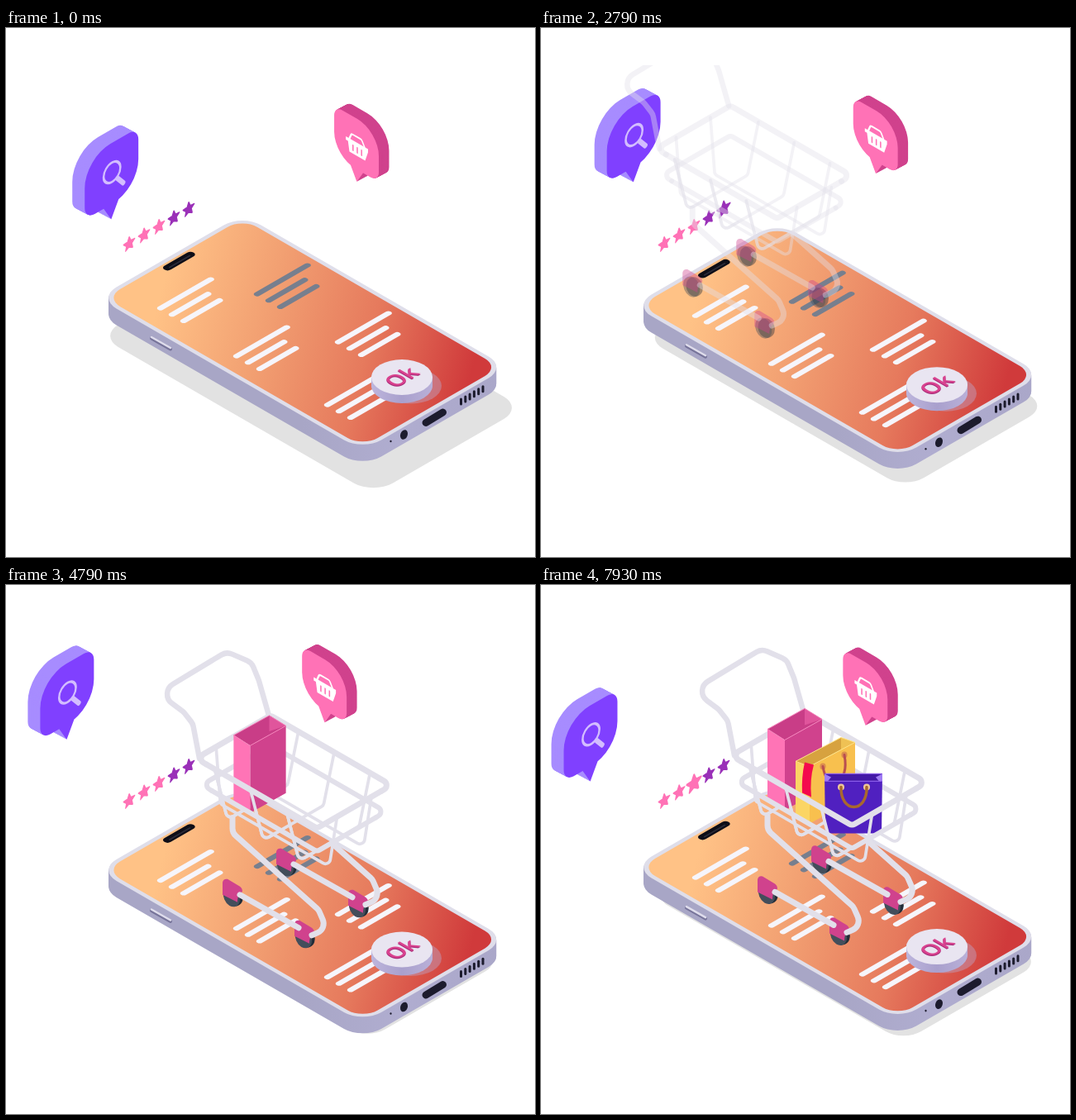
These frames come from a looping animation (640 px wide and 640 px high, 8 s). An HTML page with a canvas:

```html
<!DOCTYPE html>
<html lang="en">
<head>
<meta charset="utf-8">
<title>Mobile shopping</title>
<style>
html, body { margin: 0; width: 100%; height: 100%; overflow: hidden; background: #fff; }
canvas { display: block; }
</style>
</head>
<body>
<canvas id="stage" width="640" height="640"></canvas>
<script>
const ctx = document.getElementById('stage').getContext('2d');
const LOOP = 8000, COS = .866, SIN = .5;
const PINK = '#ff72b6', DEEP_PINK = '#d0428d', TUBE = '#e2e0ea', INK = '#1c1b2d';

// ---------- helpers ----------
// Planes of the isometric view: floor, wall rising to the right, wall falling to the right
const FLOOR = [COS, SIN, -COS, SIN], RISE = [COS, -SIN, 0, 1], FALL = [COS, SIN, 0, 1];

function at(x, y, draw, plane = [1, 0, 0, 1], scale = 1) {
  ctx.save();
  ctx.translate(x, y);
  ctx.transform(...plane, 0, 0);
  ctx.scale(scale, scale);
  draw();
  ctx.restore();
}

function fill(path, color) {
  ctx.fillStyle = color;
  ctx.fill(path);
}

function stroke(path, color, width) {
  ctx.strokeStyle = color;
  ctx.lineWidth = width;
  ctx.lineCap = ctx.lineJoin = 'round';
  ctx.stroke(path);
}

function shape(pts) {
  const p = new Path2D();
  pts.forEach(pt => p.lineTo(...pt));
  p.closePath();
  return p;
}

const poly = (color, ...pts) => fill(shape(pts), color);

function ellipse(x, y, rx, ry, color, rot = 0) {
  const p = new Path2D();
  p.ellipse(x, y, rx, ry, rot, 0, 7);
  fill(p, color);
}

// Open polyline with rounded corners
function tube(pts, width, r = 6, color = TUBE) {
  const p = new Path2D();
  p.moveTo(...pts[0]);
  for (let i = 1; i < pts.length - 1; i++) p.arcTo(...pts[i], ...pts[i + 1], r);
  p.lineTo(...pts[pts.length - 1]);
  stroke(p, color, width);
}

// Bar on the floor that runs up and to the right
function floorBar(x, y, length, width, color) {
  at(x, y, () => tube([[0, 0], [0, -length]], width, 0, color), FLOOR);
}

// Union of a path dragged along a vector
function sweep(path, dx, dy, color) {
  for (let k = 1; k >= 0; k -= .05) at(dx * k, dy * k, () => fill(path, color));
}

function gradient(x1, y1, x2, y2, ...colors) {
  const g = ctx.createLinearGradient(x1, y1, x2, y2);
  colors.forEach((c, i) => g.addColorStop(i / (colors.length - 1), c));
  return g;
}

function backOut(p) {
  const q = Math.min(p, 1) - 1;
  return 1 + 2.70158 * q ** 3 + 1.70158 * q ** 2;
}

// ---------- phone ----------
function slab(inset) {
  const flat = new Path2D(), out = new Path2D();
  flat.roundRect(inset, inset, 370 - 2 * inset, 202 - 2 * inset, 26 - inset);
  out.addPath(flat, new DOMMatrix([...FLOOR, 286, 225.4]));
  return out;
}

const body = slab(0), screen = slab(5);
const bodyTint = gradient(124, 0, 593, 0, '#a8a6c6', '#a8a6c6', '#a8a6c6', '#b0add0', '#aaa7c9');
const screenTint = gradient(190, 310, 565, 410, '#ffc286', '#f2a072', '#e67a5d', '#d03a3b');
const buttonTint = gradient(442, 0, 516, 0, '#bdb5dc', '#a9a0cd', '#b9b0d8');

function shadow(dy) {
  const scale = 1.036 - .0054 * dy;
  at(369, 416, () => at(-358.7, -368.4, () => fill(body, '#e2e2e2')), undefined, scale);
}

function textBlock(x, y, color = '#f6f5fb') {
  for (let i = 0; i < 3; i++) {
    floorBar(x + 14 * i, y + 7.7 * i, i ? 50 : 70, 7, color);
  }
}

function okButton() {
  ellipse(490, 433, 37, 21.5, 'rgba(185,170,205,.42)');
  for (let d = 10; d >= 0; d--) ellipse(479, 422.5 + d, 37, 21.5, d ? buttonTint : '#e9e5f1');
  ctx.font = '600 26px "Open Sans", sans-serif';
  ctx.textAlign = 'center';
  ['#a92b78', '#d9428f'].forEach((color, i) => at(486.5, 428 - 1.3 * i, () => {
    ctx.fillStyle = color;
    ctx.fillText('Ok', 0, 0);
  }, [COS, -SIN, COS, SIN]));
}

function phone() {
  sweep(body, 0, 20, bodyTint);
  fill(body, '#dfdeea');
  fill(screen, screenTint);

  floorBar(195.5, 290, 32, 9, '#0e0e17');
  floorBar(198, 289.5, 28, 2, '#2b2b38');

  textBlock(187, 339);
  textBlock(304, 322, '#777f8e');
  textBlock(279, 397);
  textBlock(402, 380);
  textBlock(389, 456);

  tube([[176, 375.5], [199, 388.5]], 4, 0, '#77749a');
  tube([[176, 374], [199, 387]], 2.5, 0, '#dfddec');

  ellipse(465.5, 500, 1.1, 1.3, INK);
  ellipse(481.5, 492, 4.3, 6, INK, .35);
  tube([[508, 477.5], [528.5, 465]], 9, 0, INK);
  for (let i = 0; i < 6; i++) {
    const x = 550.5 + 5.3 * i, y = 452 - 3.05 * i;
    tube([[x, y - 3], [x, y + 3]], 3, 0, INK);
  }
  okButton();
}

// ---------- speech bubbles ----------
// dir -1 gives the mirrored bubble
function bubble(x, y, dir, scale, front, side) {
  const flat = shape([[23, 68], [50, 68], [37, 92]]), path = new Path2D();
  flat.roundRect(0, 0, 75, 74, [36, 14, 36, 14]);
  path.addPath(flat, new DOMMatrix([COS * dir * scale, -SIN * scale, 0, scale, x, y]));
  sweep(path, -15 * dir * scale, -8 * scale, side);
  fill(path, front);
}

function searchBubble() {
  bubble(95, 157.5, 1, 1, '#8040ff', '#a78cff');
  at(128, 174, () => {
    const ring = new Path2D();
    ring.arc(0, 0, 11.7, 0, 7);
    stroke(ring, '#d3bdff', 3);
    tube([[8, 11.5], [16, 21]], 5.5, 0, '#d3bdff');
  }, RISE);
}

function basketBubble() {
  bubble(451, 125, -1, .83, PINK, DEEP_PINK);
  at(425, 144, () => {
    poly('#fff', [-16, -5], [15, -5], [15, -1], [11, 11], [-11, 11], [-13, -1], [-16, -1]);
    tube([[-11, -5], [-8, -12], [6, -12], [10, -5]], 2.2, 3, '#fff');
    for (let x = -6; x <= 6; x += 6) tube([[x, 1], [x, 7]], 1.8, 0, PINK);
  }, FALL);
}

// ---------- rating stars ----------
function star(i, t) {
  const period = 6380, half = period / 2;
  const d = ((t - 600 - 480 * i + half + period) % period - half) / 550;
  const scale = Math.abs(d) < 1 ? 1 + .3 * Math.cos(d * Math.PI / 2) ** 2 : 1;
  const color = i < 3 ? PINK : '#9a30b8';
  const pts = Array.from({ length: 10 }, (_, k) => {
    const r = k % 2 ? 3.7 : 8, a = k * Math.PI / 5;
    return [r * Math.sin(a), -r * Math.cos(a)];
  });
  at(149 + 18 * i, 261 - 10.5 * i, () => {
    fill(shape(pts), color);
    stroke(shape(pts), color, 1.8);
  }, RISE, scale);
}

// ---------- cart ----------
// u runs along the basket, v across it, z upwards from the top rim
const iso = (u, v, z = 0) => [320 + COS * (u - v), 154 + SIN * (u + v) - z];
const LENGTH = 169, WIDTH = 104, DEPTH = -66;

function rim(inset, z, width, front) {
  const u0 = inset, u1 = LENGTH - inset, v0 = inset, v1 = WIDTH - inset;
  const a = iso(u0 + 14, v1, z), b = iso(u1, v0 + 14, z);
  tube(front
    ? [a, iso(u1, v1, z), b]
    : [a, iso(u0, v1, z), iso(u0, v0, z), iso(u1, v0, z), b], width);
}

function rims(front) {
  rim(4, -32, 6, front);
  rim(0, 0, 7, front);
}

function crossWire(i, front) {
  const u = 30 + 50 * i;
  const near = [iso(u - 4, WIDTH), iso(u, 90, DEPTH)];
  tube(front
    ? [...near, iso(u, 70, DEPTH)]
    : [...near, iso(u, 6, DEPTH), iso(u + 9, 0)], 3.7);
}

function longWire(v) {
  tube([iso(0, v), iso(6, v, DEPTH), iso(158, v, DEPTH), iso(LENGTH, v)], 3.7);
}

function wheel(x, y) {
  at(x, y, () => {
    ellipse(2.5, 4, 10, 12, '#232d38', -.35);
    ellipse(-1, 4, 9.5, 13, '#434e5b', -.4);
    fill(new Path2D('M-12 -13Q-11 -18 -6 -17L9 -8Q12 -6 12 -2L9 1Q6 4 6 11L-12 2Z'), DEEP_PINK);
  });
}

// The far side shows only the lower part of its leg
function runner(far) {
  const leg = [[274, 278], [274, 296], [331, 347], [378, 389], [388, 412], [370, 420]];
  at(far ? 65 : 0, far ? -37 : 0, () => {
    wheel(274, 369);
    wheel(361, 419);
    tube([[283, 371], [354, 411]], 7);
    tube(leg.slice(far ? 2 : 0), 7, 12);
  });
}

function cartBack() {
  runner(true);
  runner(false);
  tube([[234, 206], [226, 164], [215, 150], [184, 127], [250, 87], [267, 77],
    [297, 90], [306, 112], [318, 154]], 6.5, 14);
  for (let i = 0; i < 3; i++) crossWire(i, false);
  longWire(28);
  rims(false);
}

function cartFront() {
  for (let i = 0; i < 3; i++) crossWire(i, true);
  longWire(76);
  rims(true);
}

// ---------- shopping bags ----------
// Open box given by three corners of its mouth: left, front and right
function box(l, f, r, h, { left, right, inner, far, edge }) {
  const back = [l[0] + r[0] - f[0], l[1] + r[1] - f[1]];
  const down = ([x, y]) => [x, y + h];
  poly(inner, l, back, r, f);
  poly(far, back, r, [back[0], back[1] + 20]);
  poly(left, l, f, down(f), down(l));
  poly(right, f, r, down(r), down(f));
  stroke(shape([l, back, r, f]), edge, 1);
}

function pinkBag() {
  box([274, 174], [295, 187], [340, 162], 85,
    { left: '#ff74b6', right: DEEP_PINK, inner: '#c93d87', far: '#e0559c', edge: '#f583bb' });
}

function yellowBag() {
  box([308, 213], [325, 219], [380, 190], 69,
    { left: '#fbd564', right: '#f8c04e', inner: '#d7a23f', far: '#efc154', edge: '#ffe58a' });
  fill(new Path2D('M319 214L330 217Q325 235 327 256L316 251Q315 232 319 214Z'), '#f40a4d');
  ellipse(341, 219, 3.6, 4, '#dc8d4d');
  ellipse(367, 205, 3.6, 4, '#dc8d4d');
  stroke(new Path2D('M341 219Q345 241 356 240Q372 231 367 205'), '#b94f50', 3);
}

function purpleBag() {
  poly('#5020c0', [343, 228], [413, 228], [412, 300], [344, 300]);
  poly('#4318a6', [343, 228], [413, 228], [413, 237], [343, 237]);
  for (const side of [-1, 1]) {
    const x = 378 + 35 * side;
    poly('#a07cf4', [x, 228], [x - 8 * side, 232], [x - 4 * side, 237], [x, 237]);
    ellipse(378.5 + 15.5 * side, 244, 4, 4, '#edc69b');
  }
  for (const y of [228, 237]) tube([[344, y], [412, y]], 1.3, 0, '#8a5ce8');
  stroke(new Path2D('M363 244C362 276 395 276 394 244'), '#a9682d', 3.5);
}

const bags = [
  { draw: pinkBag, start: 4120, x: 307, y: 271 },
  { draw: yellowBag, start: 4850, x: 344, y: 240 },
  { draw: purpleBag, start: 5685, x: 378, y: 300 }
];

function popIn({ draw, start, x, y }, t) {
  if (t <= start) return;
  at(x, y, () => at(-x, -y, draw), undefined, backOut((t - start) / 2000));
}

function cart(t, dy) {
  const start = 2490, end = 4374;
  if (t < start) return;
  const left = Math.max(0, (end - t) / (end - start)) ** 3;
  const slide = -153 * left;
  ctx.save();
  ctx.beginPath();
  ctx.rect(0, 45, 640, 595);
  ctx.clip();
  ctx.globalAlpha = 1 - left;
  ctx.translate(slide, slide * .6 + dy - 14.7);
  cartBack();
  bags.forEach(bag => popIn(bag, t));
  cartFront();
  ctx.restore();
}

// ---------- frame ----------
function render(t) {
  ctx.fillStyle = '#fff';
  ctx.fillRect(0, 0, 640, 640);
  const dy = 10.15 * (1 - Math.cos(Math.PI * t / 5930));
  shadow(dy);
  at(0, dy, phone);
  at(-35 + 38.5 * Math.cos(.00052 * (t - 800)), -14 - 35 * Math.cos(.00053 * (t - 3770)), searchBubble);
  at(-2.1 * dy, -1.06 * dy, basketBubble);
  for (let i = 0; i < 5; i++) star(i, t);
  cart(t, dy);
}

const origin = performance.now();
function tick() {
  render((performance.now() - origin) % LOOP);
  requestAnimationFrame(tick);
}
tick();
</script>
</body>
</html>
```
